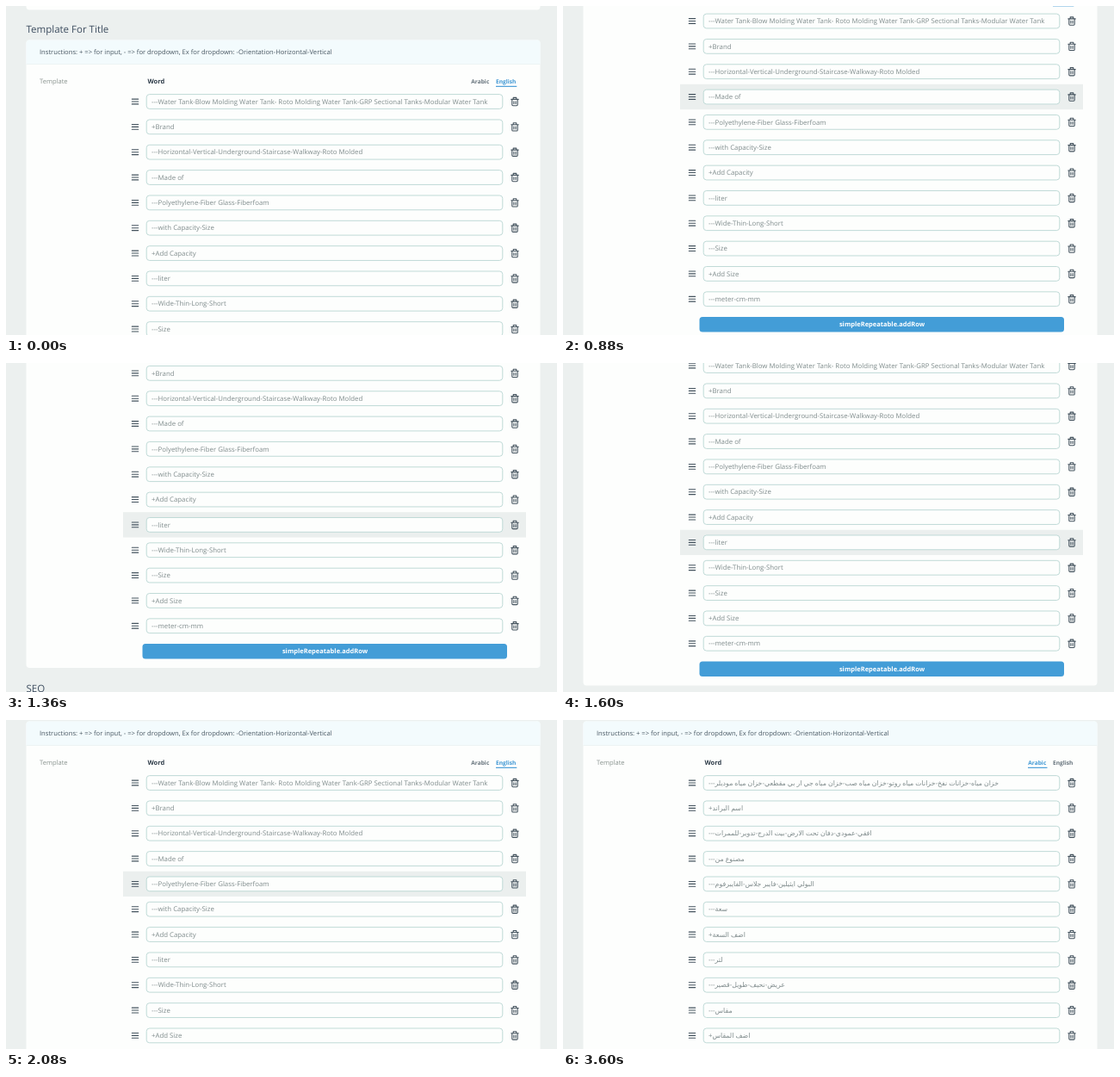
Animation of 640 by 382 pixels, one loop 3760 ms. Source, as an HTML page:

```html
<!DOCTYPE html>
<html lang="en">
<head>
<meta charset="utf-8">
<style>
  html, body { margin: 0; width: 100%; height: 100%; overflow: hidden; background: #ecf0ef; }
  svg { display: block; width: 640px; height: 382px; }
  text { font: 7.82px "Open Sans", "DejaVu Sans", sans-serif; fill: #7f8b8c; text-rendering: geometricPrecision; white-space: pre; }
  .card { fill: #fdfefd; }
  .title { font-size: 11.5px; fill: #3d4d5f; }
  .note { font-size: 7.62px; fill: #485762; }
  .label { font-size: 7.55px; fill: #89938f; }
  .head { font-size: 7.5px; font-weight: 700; fill: #2d3b48; }
  .tab { font-size: 6.6px; font-weight: 700; fill: #66737c; }
  .tab.on { fill: #3f97d4; }
  .button { font-size: 7.5px; font-weight: 700; fill: #fff; text-anchor: middle; }
  .box { fill: #fdfefd; stroke: #b9d6d3; stroke-width: .9; }
  .icon { fill: none; stroke: #43525d; stroke-width: 1.1; stroke-linecap: round; stroke-linejoin: round; }
</style>
</head>
<body>
<svg viewBox="0 0 640 382">
  <g id="page">
    <rect class="card" x="23.5" y="-30" width="597" height="34.5" rx="4"/>
    <text class="title" x="23.5" y="31">Template For Title</text>
    <rect class="card" x="23.5" y="39.5" width="597" height="443" rx="4"/>
    <path d="M23.5 67.5V43.5a4 4 0 0 1 4-4H616.5a4 4 0 0 1 4 4V67.5Z" fill="#f3fbfd"/>
    <path d="M23.5 67.5H620.5" stroke="#e9f1f1" stroke-width=".7"/>
    <text class="note" x="39" y="55.8">Instructions: + =&gt; for input, - =&gt; for dropdown, Ex for dropdown: -Orientation-Horizontal-Vertical</text>
    <text class="label" x="39" y="90.4">Template</text>
    <text class="head" x="164.5" y="90.2">Word</text>
    <text class="tab" id="arabic" x="540.3" y="90">Arabic</text>
    <text class="tab" id="english" x="569" y="90">English</text>
    <rect id="line" y="92.8" height="1.1" fill="#3f97d4"/>
    <rect id="hover" x="136" width="468" height="29.3" fill="#ebefee"/>
    <g id="rows"></g>
    <rect x="158.5" y="454.4" width="423.5" height="17.6" rx="3.5" fill="#439dd7"/>
    <text class="button" x="370.5" y="465.7">simpleRepeatable.addRow</text>
    <text class="title" x="23.5" y="510.6">SEO</text>
  </g>
</svg>
<script>
const LOOP = 3760, STEP = 80, FIRST = 111, GAP = 29.34;
const $ = id => document.getElementById(id);

const words = {
  english: [
    '---Water Tank-Blow Molding Water Tank- Roto Molding Water Tank-GRP Sectional Tanks-Modular Water Tank',
    '+Brand',
    '---Horizontal-Vertical-Underground-Staircase-Walkway-Roto Molded',
    '---Made of',
    '---Polyethylene-Fiber Glass-Fiberfoam',
    '---with Capacity-Size',
    '+Add Capacity',
    '---liter',
    '---Wide-Thin-Long-Short',
    '---Size',
    '+Add Size',
    '---meter-cm-mm'
  ],
  arabic: [
    '---خزان مياه-خزانات نفخ-خزانات مياه روتو-خزان مياه صب-خزان مياه جي ار بي مقطعي-خزان مياه موديلر',
    '+اسم البراند',
    '---افقي-عمودي-دفان تحت الارض-بيت الدرج-تدوير-للممرات',
    '---مصنوع من',
    '---البولي ايثيلين-فايبر جلاس-الفايبرفوم',
    '---سعة',
    '+اضف السعة',
    '---لتر',
    '---عريض-نحيف-طويل-قصير',
    '---مقاس',
    '+اضف المقاس',
    '---متر-سم-مم'
  ]
};

// [time, scroll offset]
const scroll = [[560, 0], [640, 9], [880, 93.5], [960, 112], [1040, 124], [1120, 128.5],
  [1440, 128.5], [1600, 108], [1840, 53.5], [2000, 41], [2080, 38], [LOOP, 38]];

// [time, row under the pointer], 0 for none
const hovers = [[0, 0], [80, 9], [160, 8], [240, 7], [320, 6], [400, 5], [480, 4],
  [1200, 8], [2080, 5], [2160, 4], [2240, 2], [2320, 1], [2400, 0]];

$('rows').innerHTML = words.english.map((_, i) => `
  <g transform="translate(0 ${FIRST + i * GAP})">
    <path class="icon" d="M146.3 -2.9H153.7M146.3 0H153.7M146.3 2.9H153.7"/>
    <rect class="box" x="163.2" y="-8.4" width="413.6" height="16.8" rx="3.5"/>
    <text x="169" y="2.7"></text>
    <path class="icon" d="M586.8 -2.6H595.2M589.2 -2.8V-4.6H592.8V-2.8M587.8 -2.4V3.6Q587.8 4.7 588.9 4.7H593.1Q594.2 4.7 594.2 3.6V-2.4M589.9 -.3V2.5M592.1 -.3V2.5"/>
  </g>`).join('');
const cells = document.querySelectorAll('#rows text');

function offsetAt(t) {
  const i = scroll.findIndex(k => k[0] >= t);
  if (i < 1) return 0;
  const [t0, y0] = scroll[i - 1], [t1, y1] = scroll[i];
  return y0 + (y1 - y0) * (t - t0) / (t1 - t0);
}

let language;
function setLanguage(name) {
  if (name === language) return;
  language = name;
  cells.forEach((cell, i) => cell.textContent = words[name][i]);
  for (const id in words) $(id).classList.toggle('on', id === name);
  $('line').setAttribute('x', name === 'arabic' ? 540 : 569);
  $('line').setAttribute('width', name === 'arabic' ? 22.5 : 24.3);
}

function draw(now) {
  const t = Math.floor(now % LOOP / STEP) * STEP;
  const row = hovers.filter(h => h[0] <= t).pop()[1];
  $('page').setAttribute('transform', `translate(0 ${-offsetAt(t)})`);
  $('hover').setAttribute('y', FIRST + (row - 1.5) * GAP);
  $('hover').setAttribute('visibility', row ? 'visible' : 'hidden');
  setLanguage(t < 2400 ? 'english' : 'arabic');
}

let start;
function tick(now) {
  start ??= now;
  draw(now - start);
  requestAnimationFrame(tick);
}
draw(0);
requestAnimationFrame(tick);
</script>
</body>
</html>
```
